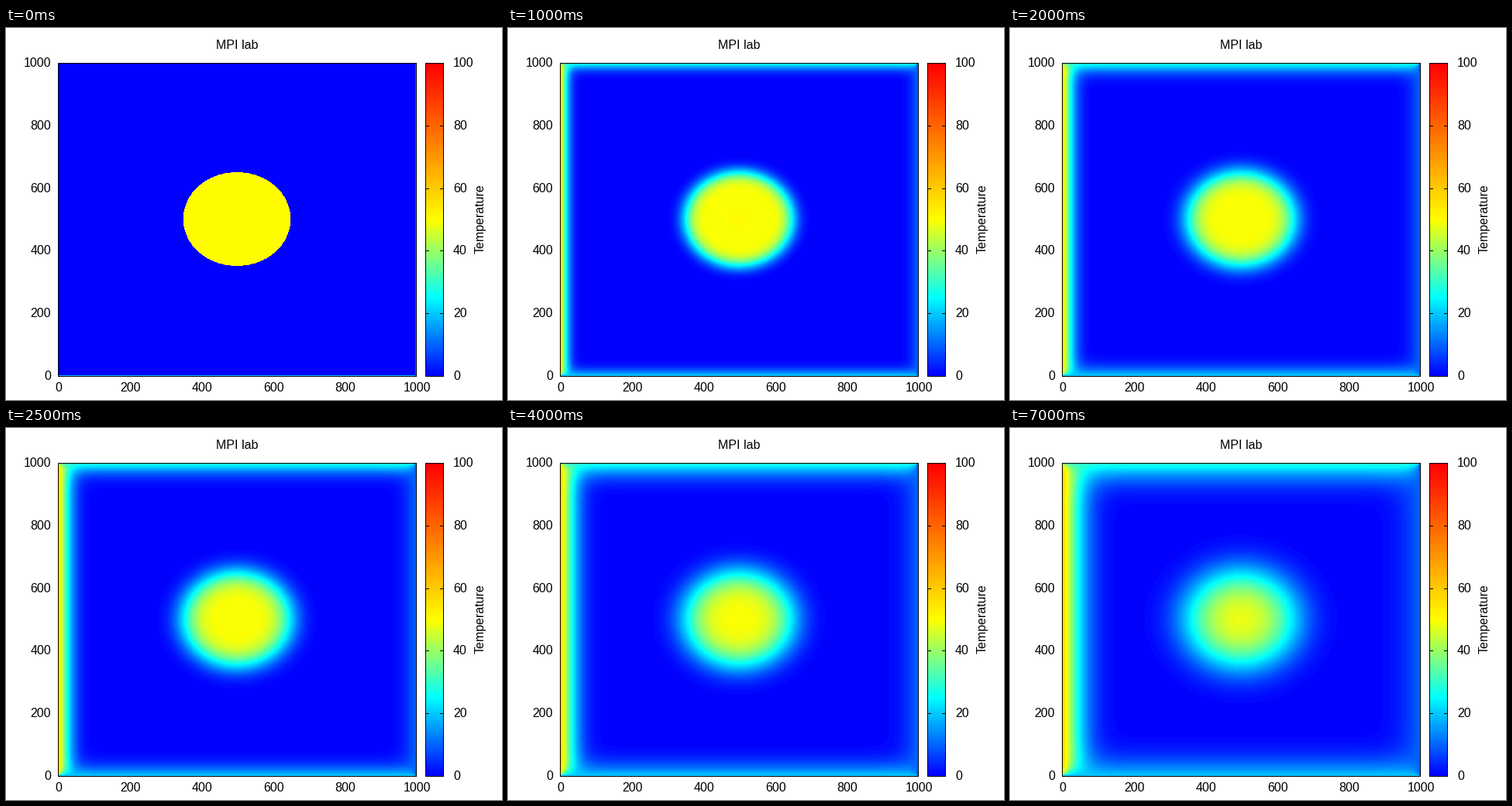
Recreate the animation shown at these times as a matplotlib script. Size 640x480 px, loop 8 s.

```python
import numpy as np
import matplotlib.pyplot as plt
from matplotlib.animation import FuncAnimation
from matplotlib.patches import Rectangle

W, H, DPI = 640, 480, 100
LEFT, RIGHT, TOP, BOTTOM = 67, 529, 45, 449   # border lines of the map
BAR_LEFT, BAR_RIGHT = 541, 564
SIZE = 1000                                   # grid points per side
WALLS = dict(left=60, right=10, bottom=20, top=30)
SPREAD = 125                                  # diffusion per frame, grid units squared
LEVELS = 128
FRAMES, LAST_STEP, INTERVAL = 16, 14, 500

plt.rcParams["font.family"] = "Liberation Sans"
plt.rcParams["font.size"] = 16 * 72 / DPI


def palette(temp):
    """Stepped blue - cyan - yellow - red colours for 0 to 100 degrees."""
    level = np.clip(np.floor(temp / 100 * LEVELS + 1e-6), 0, LEVELS - 1)
    g = level / (LEVELS - 1)
    stops = [0, 0.25, 0.5, 1]
    return np.dstack([np.interp(g, stops, c)
                      for c in ([0, 0, 1, 1], [0, 1, 1, 0], [1, 1, 0, 0])])


# Heat equation with fixed walls, solved in sine modes
N = SIZE - 1
k = np.arange(1, N)
modes = np.sin(np.pi * np.outer(np.arange(SIZE), k) / N)
inner = modes[1:-1]

y, x = np.mgrid[1:N, 1:N]
start = np.where((x - 500) ** 2 + (y - 500) ** 2 < 150 ** 2, 50.0, 0.0)
start_hat = inner @ start @ inner

source = np.zeros_like(start)
source[:, 0] += WALLS["left"]
source[:, -1] += WALLS["right"]
source[0] += WALLS["bottom"]
source[-1] += WALLS["top"]
rate = 4 * np.sin(np.pi * k / (2 * N)) ** 2
decay = rate[:, None] + rate[None, :]
steady_hat = (inner @ source @ inner) / decay

# Grid point shown by each pixel column and row
px = np.arange(LEFT + 1, RIGHT)
py = np.arange(TOP + 1, BOTTOM)
cols = np.round((px + 0.5 - LEFT) / (RIGHT - LEFT) * SIZE).astype(int).clip(0, N)
rows = np.round((BOTTOM - 1 - py) / (BOTTOM - TOP) * SIZE).astype(int).clip(0, N)
col_modes = modes[cols].T
row_modes = modes[rows] * (2 / N) ** 2


def temperature(step):
    fade = np.exp(-SPREAD * step * decay)
    hat = steady_hat + (start_hat - steady_hat) * fade
    temp = row_modes @ hat @ col_modes
    temp[:, cols == 0] = WALLS["left"]
    temp[rows == N] = WALLS["top"]
    temp[rows == 0] = WALLS["bottom"]
    temp[:, cols == N] = WALLS["right"]
    return temp


fig = plt.figure(figsize=(W / DPI, H / DPI), dpi=DPI, facecolor="white")
ax = fig.add_axes([0, 0, 1, 1])


def show(colors, x0, x1):
    return ax.imshow(colors, extent=(x0 + 1, x1, BOTTOM, TOP + 1),
                     interpolation="nearest", aspect="auto", zorder=1)


def fill(x0, y0, w, h):
    ax.add_patch(Rectangle((x0, y0), w, h, fc="black", lw=0,
                           antialiased=False, zorder=3))


def frame_box(x0, x1):
    w, h = x1 - x0 + 1, BOTTOM - TOP + 1
    fill(x0, TOP, w, 1)
    fill(x0, BOTTOM, w, 1)
    fill(x0, TOP, 1, h)
    fill(x1, TOP, 1, h)


heat = show(palette(temperature(0)), LEFT, RIGHT)
scale = (BOTTOM - py) / (BOTTOM - TOP) * 100
show(palette(scale[:, None]), BAR_LEFT, BAR_RIGHT)
frame_box(LEFT, RIGHT)
frame_box(BAR_LEFT, BAR_RIGHT)

for i in range(6):
    row = round(BOTTOM - i / 5 * (BOTTOM - TOP))
    col = LEFT + 1 + i / 5 * (RIGHT - LEFT)
    ax.text(58, row + 5, str(200 * i), ha="right", va="baseline")
    ax.text(col, 469, str(200 * i), ha="center", va="baseline")
    ax.text(577, row + 5, str(20 * i), ha="left", va="baseline")
    fill(BAR_LEFT, row, 5, 1)
    fill(BAR_RIGHT - 4, row, 5, 1)

ax.text(298, 27, "MPI lab", ha="center", va="baseline")
ax.text(617, 246.5, "Temperature", rotation=90, rotation_mode="anchor",
        ha="center", va="baseline")

ax.set_xlim(0, W)
ax.set_ylim(H, 0)
ax.axis("off")


def update(i):
    heat.set_data(palette(temperature(min(i, LAST_STEP))))
    return [heat]


anim = FuncAnimation(fig, update, frames=FRAMES, interval=INTERVAL,
                     repeat=True, repeat_delay=0)
plt.show()
```
